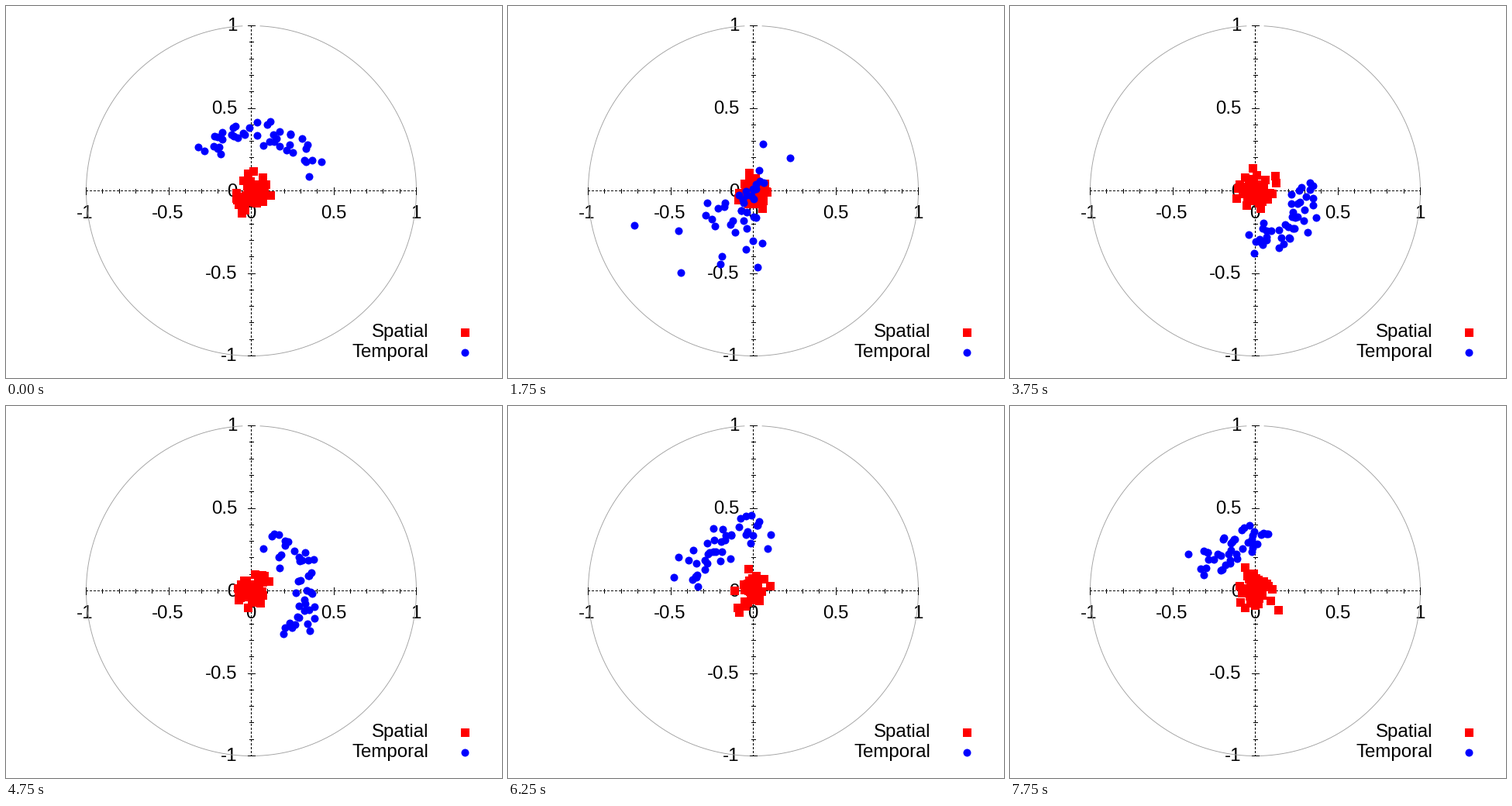
A matplotlib script that plays this animation: 640x480 px, repeating every 8 s.

```python
import numpy as np
import matplotlib.pyplot as plt
from matplotlib.animation import FuncAnimation

W, H, DPI = 640, 480, 80
PX = 72 / DPI                 # points per pixel
CX, CY, R = 316, 238, 213     # centre and radius of the unit circle
FRAMES, INTERVAL = 32, 250
COUNT = 42                    # samples in each cloud
RED, BLUE = "#ff0000", "#0000ff"

# Temporal cloud: step, heading and half width (degrees), radius and its scatter
KEYS = np.array([
    (0, 80, 62, 78, 9),
    (4, 152, 58, 71, 12),
    (7, 236, 42, 38, 40),
    (8, 400, 50, 70, 12),
    (12, 637, 42, 60, 14),
    (19, 730, 60, 73, 9),
    (25, 1207, 46, 78, 12),
    (31, 1557, 40, 69, 14),
])


def temporal(step, rng):
    heading, half, radius, scatter = (
        np.interp(step, KEYS[:, 0], col) for col in KEYS[:, 1:].T)
    a = heading + half * np.linspace(-1, 1, COUNT) + rng.normal(0, 4, COUNT)
    a = np.radians(a)
    r = radius + rng.normal(0, scatter, COUNT)
    return CX + r * np.cos(a), CY - r * np.sin(a)


def spatial(rng):
    return rng.normal(CX + 1, 12, COUNT), rng.normal(CY, 11, COUNT)


fig = plt.figure(figsize=(W / DPI, H / DPI), dpi=DPI, facecolor="white")
ax = fig.add_axes([0, 0, 1, 1])
ax.set_xlim(0, W)
ax.set_ylim(H, 0)
ax.axis("off")


def line(x, y, **style):
    style = {"color": "black", "lw": PX, "aa": False, **style}
    ax.plot(x, y, solid_capstyle="butt", dash_capstyle="butt", **style)


def label(x, y, text, align):
    ax.text(x, y, text, ha=align, va="baseline", family="Liberation Sans",
            size=24 * PX, color="black", zorder=1)


def markers(shape, size, color, x=(), y=()):
    return ax.plot(x, y, shape, ms=size * PX, mew=0, color=color, aa=False)[0]


# Unit circle, open at the very top
a = np.radians(np.linspace(93, 447, 400))
line(CX + 0.5 + R * np.cos(a), CY + 0.5 - R * np.sin(a),
     color="#a0a0a0", lw=0.9 * PX, aa=True)

# Dotted axes with ticks and numbers
line([CX - R, CX + R], [CY, CY], ls=(0, (2, 2)))
line([CX, CX], [CY - R, CY + R], ls=(0, (2, 2)))
for n in range(-10, 11):
    d = n / 10 * R
    half = 4.5 if n % 5 == 0 else 2.5
    line([CX + d, CX + d], [CY - half, CY + half])
    line([CX - half, CX + half], [CY - d, CY - d])
    if n % 5 == 0:
        text = f"{n / 10:g}"
        label(CX + d - (n < 0), 274.5, text, "center")
        label(298.5, CY - d + 7.5, text, "right")

red = markers("s", 11, RED)
blue = markers("o", 10, BLUE)
for text, y, shape, size, color in (("Spatial", 421, "s", 11, RED),
                                    ("Temporal", 447, "o", 10, BLUE)):
    label(545, y + 6.5, text, "right")
    markers(shape, size, color, [592], [y])


def draw(step):
    rng = np.random.default_rng(100 + step)
    blue.set_data(*temporal(step, rng))
    red.set_data(*spatial(rng))
    return red, blue


anim = FuncAnimation(fig, draw, frames=FRAMES, interval=INTERVAL,
                     init_func=lambda: draw(0), repeat=True, repeat_delay=0)
plt.show()
```
